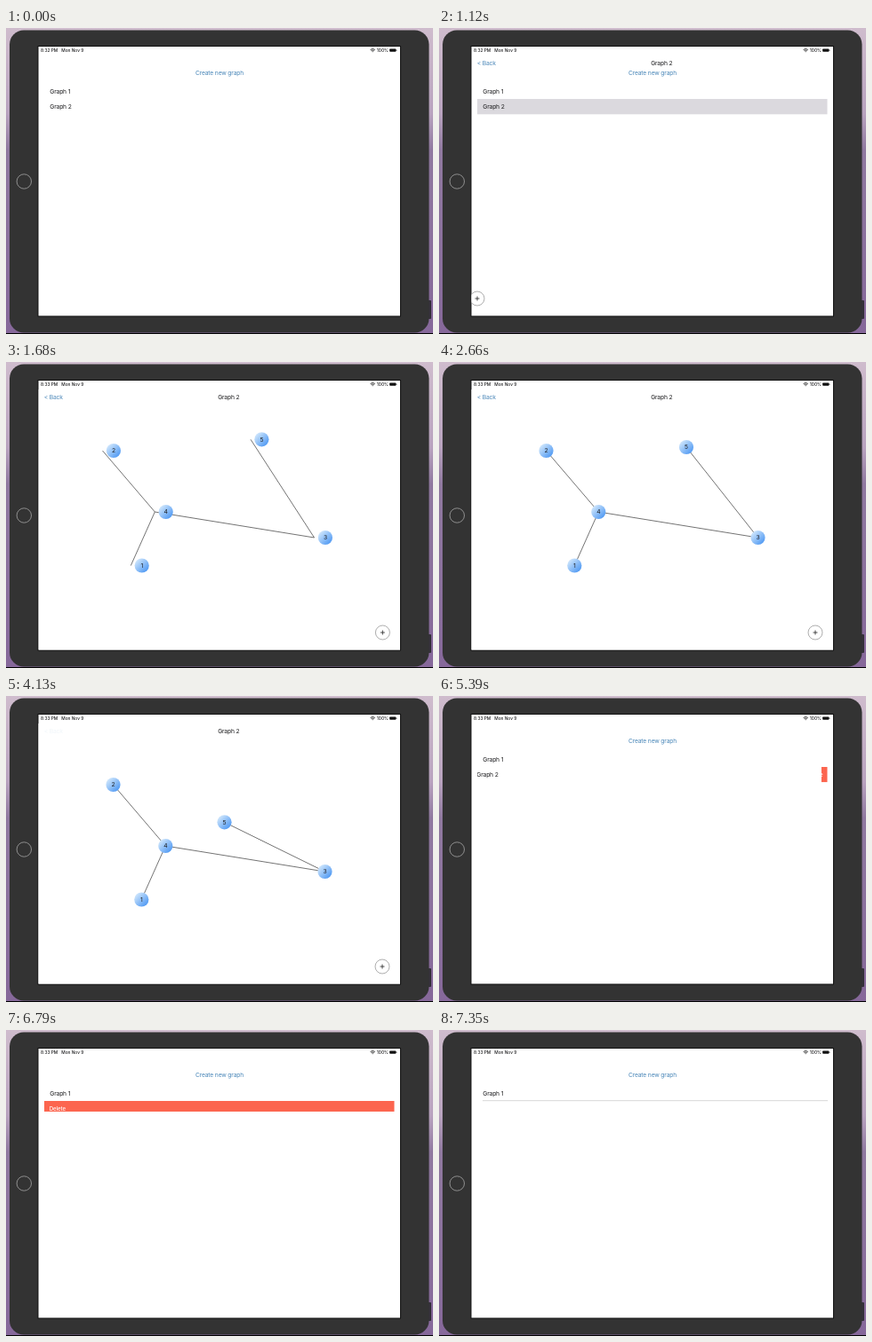
An HTML page for the animation above (8000 ms loop, 480 px wide and 345 px high).

```html
<!DOCTYPE html>
<html lang="en">
<head>
<meta charset="utf-8">
<title>Graph editor on a tablet</title>
<style>
  html, body { margin: 0; width: 100%; height: 100%; overflow: hidden; background: #000; }
  svg { display: block; }
  text { font: 6.75px Inter, Roboto, sans-serif; letter-spacing: -.025em; fill: #1c1c1e; }
  .mid { text-anchor: middle; }
  .link { fill: #4a87b8; }
  .status text { font-size: 4.8px; font-weight: 500; letter-spacing: 0; }
  .edges line { stroke: #444; stroke-width: .75; }
  #remove text { font-size: 6px; font-weight: 500; letter-spacing: 0; fill: #fff; }
</style>
</head>
<body>
<svg width="480" height="345" viewBox="0 0 480 345">
  <defs>
    <linearGradient id="wall" x2="0" y2="1">
      <stop offset="0" stop-color="#cfbccd"/>
      <stop offset=".28" stop-color="#b9a3bf"/>
      <stop offset=".4" stop-color="#9079a0"/>
      <stop offset="1" stop-color="#86689a"/>
    </linearGradient>
    <linearGradient id="ball" x2="1" y2="1">
      <stop offset=".1" stop-color="#d4e9fc"/>
      <stop offset=".9" stop-color="#4c97f3"/>
    </linearGradient>
    <clipPath id="screen"><rect x="36.5" y="21" width="406.5" height="303.5"/></clipPath>
    <clipPath id="cell"><rect x="43" y="79" width="394" height="19"/></clipPath>
  </defs>

  <rect width="480" height="344" fill="url(#wall)"/>
  <rect x="474" y="307" width="4" height="21" rx="1" fill="#35303a"/>
  <rect x="4" y="2.5" width="471.5" height="341" rx="16" fill="#333"/>
  <circle cx="20.3" cy="173" r="8.2" fill="none" stroke="#999" stroke-width=".9"/>
  <rect x="36" y="20.5" width="407.5" height="304.5" fill="#fff" stroke="#111"/>

  <g clip-path="url(#screen)">
    <g id="list">
      <text class="mid link" x="240" y="53">Create new graph</text>
      <text x="49.3" y="73.7">Graph 1</text>
      <line id="rule" x1="49" x2="437" y1="79.7" y2="79.7" stroke="#ccc" stroke-width=".8"/>
      <g clip-path="url(#cell)">
        <rect id="pressed" x="43" y="80" width="393.5" height="17.3" fill="#dbd9de"/>
        <text id="row" x="49.3" y="91">Graph 2</text>
        <svg id="remove" y="80">
          <rect width="100%" height="100%" fill="#fc654f"/>
          <text y="10.8">Delete</text>
        </svg>
      </g>
    </g>

    <g id="page">
      <rect id="sheet" x="36" y="31" width="408" height="294" fill="#fff"/>
      <g class="edges" id="edges"></g>
      <g id="nodes"></g>
      <g id="plus">
        <circle r="8" fill="#fff" stroke="#8a8a8a" stroke-width=".7"/>
        <path d="M-2.5 0H2.5M0-2.5V2.5" stroke="#222" stroke-width=".8"/>
      </g>
    </g>

    <g id="nav">
      <text class="link" id="back" x="42.7" y="42">&lt; Back</text>
      <text class="mid" x="250.3" y="42">Graph 2</text>
    </g>

    <g class="status">
      <text id="clock" x="39" y="27"></text>
      <text x="62.3" y="27">Mon Nov 9</text>
      <text x="416.8" y="27">100%</text>
      <g fill="none" stroke="#111" stroke-width=".8">
        <path d="M409.6 24.5q2.6-2.1 5.2 0M410.6 25.7q1.6-1.3 3.2 0"/>
        <path d="M411.7 26.7h1M438.9 24.6v1.2"/>
      </g>
      <rect x="431.2" y="23.6" width="7.2" height="3.2" rx=".7" fill="#111"/>
    </g>
  </g>
</svg>

<script>
const LOOP = 8000, STEP = 70;
const $ = id => document.getElementById(id);
const set = (el, attrs) => { for (const k in attrs) el.setAttribute(k, attrs[k]); };
const add = (parent, tag, attrs) => {
  const el = document.createElementNS('http://www.w3.org/2000/svg', tag);
  set(el, attrs);
  return parent.appendChild(el);
};
const show = (id, opacity) => set($(id), { opacity: +opacity });
const move = (el, x, y = 0) => set(el, { transform: `translate(${x} ${y})` });
const clamp = v => Math.min(1, Math.max(0, v));
const ramp = (t, from, to) => clamp((t - from) / (to - from));

// Piecewise linear value through [time, value] points.
function track(t, points) {
  let [t0, v0] = points[0];
  for (const [t1, v1] of points) {
    if (t < t1) return v0 + (v1 - v0) * ramp(t, t0, t1);
    [t0, v0] = [t1, v1];
  }
  return v0;
}

// Remaining distance of a critically damped spring, from 1 to 0.
const spring = (t, start, rate) => {
  const s = Math.max(0, t - start) / 1000 * rate;
  return (1 + s) * Math.exp(-s);
};

const spots = { 1: [152.3, 229.5], 2: [120.5, 100], 3: [358.5, 198], 4: [179.3, 169], 5: [287, 87.3] };
const edges = [[2, 4], [1, 4], [4, 3], [5, 3]].map(([a, b]) => ({ a, b, el: add($('edges'), 'line', {}) }));
const nodes = Object.keys(spots).map(id => {
  const el = add($('nodes'), 'g', {});
  add(el, 'circle', { r: 8.1, fill: 'url(#ball)' });
  add(el, 'text', { class: 'mid', y: 2.4 }).textContent = id;
  return { id, el };
});

function drawPage(t) {
  const slide = 407 * spring(t, 1120, 16.6);
  spots[5] = [
    track(t, [[2590, 287], [2660, 278], [2800, 258], [2940, 245.5]]),
    track(t, [[2590, 87.3], [2660, 96], [2800, 122], [2940, 142.3]])
  ];
  for (const { id, el } of nodes) move(el, spots[id][0] + slide, spots[id][1]);
  for (const { a, b, el } of edges) {
    const [x1, y1] = spots[a], [x2, y2] = spots[b];
    set(el, { x1, y1, x2, y2 });
  }
  move($('edges'), -406 * spring(t, 1120, 9.6));
  move($('sheet'), slide);
  move($('plus'), t < 1190 ? 43 : 423 + slide, 305);
  return slide;
}

function drawSwipe(t) {
  const width = track(t, [[5320, 0], [5600, 28], [5950, 88], [6230, 160], [6510, 290], [6650, 394]]);
  const height = 17.3 * (1 - ramp(t, 6700, 7000));
  move($('row'), -width);
  show('row', t < 6650);
  set($('remove'), { x: 436.7 - width, width, height });
  // Past the threshold the label sticks to the leading edge.
  set($('remove').lastElementChild, { x: width > 200 ? 6 : width - 23.7 });
}

function draw(t) {
  const pushed = t >= 1120 && t < 4410;
  const popping = ramp(t, 4200, 4410);
  const slide = drawPage(t);
  drawSwipe(t);

  show('page', pushed && 1 - popping);
  show('nav', pushed && 1 - popping);
  show('list', t < 1120 ? 1 : t < 4200 ? 1 - ramp(t, 1120, 1330) : popping);
  move($('list'), t >= 1120 && t < 4200 ? (slide - 407) * .3 : 0);
  show('pressed', t >= 980 && t < 4200);
  show('back', t < 4130 ? 1 : .08);
  show('rule', ramp(t, 6930, 7140));
  $('clock').textContent = t < 1190 ? '8:32 PM' : '8:33 PM';
}

function tick() {
  const t = performance.now() % LOOP;
  draw(Math.floor(t / STEP) * STEP);
  requestAnimationFrame(tick);
}
tick();
</script>
</body>
</html>
```
